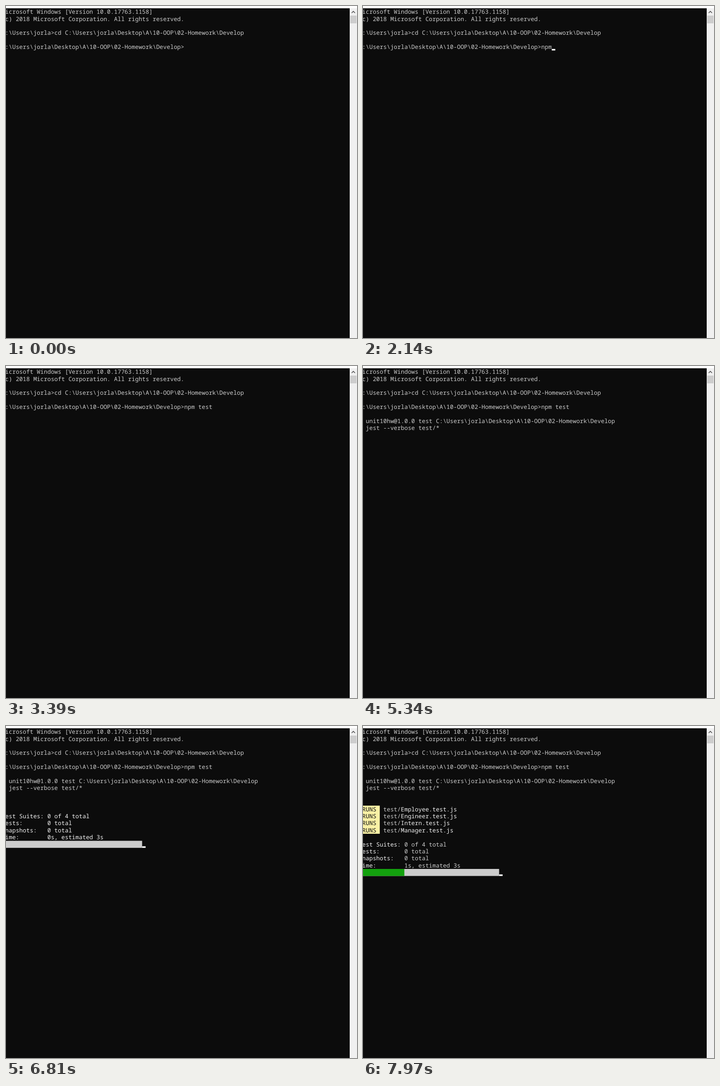
An HTML page with a canvas for the animation above (8000 ms loop, 770 by 727 pixels).

```html
<!DOCTYPE html>
<html lang="en">
<head>
<meta charset="utf-8">
<title>Terminal test run</title>
<style>
  html, body { margin: 0; width: 100%; height: 100%; overflow: hidden; background: #0c0c0c; }
  canvas { display: block; }
</style>
</head>
<body>
<canvas id="stage" width="770" height="727"></canvas>
<script>
const ctx = document.getElementById('stage').getContext('2d');
const LOOP = 8000;
const CELL_W = 7.7, CELL_H = 15.4, LEFT = -9.4, TOP = 5;
const GREY = '#cccccc', WHITE = '#f2f2f2', BLACK = '#0c0c0c', GREEN = '#13a10e', YELLOW = '#f9f1a5';
const BAR_COLS = 40;

const HOME = 'C:\\Users\\jorla';
const FOLDER = HOME + '\\Desktop\\A\\10-OOP\\02-Homework\\Develop';
const PROMPT = FOLDER + '>';
const COMMAND = 'npm test';

// Time at which each character of the command appears
const KEY_TIMES = [1680, 1910, 2140, 2540, 2920, 3080, 3170, 3390];
// Spans in which the prompt cursor is hidden
const CURSOR_OFF = [[0, 1300], [1840, 1910], [2310, 2540], [2850, 2920], [3390, LOOP]];

const colX = col => LEFT + col * CELL_W;
const rowY = row => TOP + row * CELL_H;

function rect(x, y, w, h, color) {
  ctx.fillStyle = color;
  ctx.fillRect(x, y, w, h);
}

function cells(col, row, cols, rows, color) {
  rect(colX(col), rowY(row), cols * CELL_W, rows * CELL_H, color);
}

function print(text, col, row, color = GREY) {
  ctx.fillStyle = color;
  const baseline = Math.round(rowY(row) + 12.2);
  [...text].forEach((ch, i) => {
    if (ch !== ' ') ctx.fillText(ch, colX(col + i), baseline);
  });
}

function cursor(col, row) {
  rect(colX(col), rowY(row + 1) - 3.4, CELL_W, 3.4, '#ffffff');
}

function drawWindow() {
  rect(0, 0, 770, 727, BLACK);
  rect(0, 0, 770, 5, '#ffffff');
  rect(754, 5, 16, 722, '#f0f0f0');
  rect(755, 21, 14, 17, '#cdcdcd');
  ctx.strokeStyle = '#505050';
  ctx.lineWidth = 1.6;
  ctx.beginPath();
  ctx.moveTo(758.3, 15.3);
  ctx.lineTo(762, 11.6);
  ctx.lineTo(765.7, 15.3);
  ctx.stroke();
}

function drawPrompt(t) {
  print('Microsoft Windows [Version 10.0.17763.1158]', 0, 0);
  print('(c) 2018 Microsoft Corporation. All rights reserved.', 0, 1);
  print(HOME + '>cd ' + FOLDER, 0, 3);
  const typed = KEY_TIMES.filter(time => t >= time).length;
  print(PROMPT + COMMAND.slice(0, typed), 0, 5);
  if (!CURSOR_OFF.some(([from, to]) => t >= from && t < to)) cursor(PROMPT.length + typed, 5);
}

function drawSummary(row, valueColor, seconds, doneCols) {
  const lines = [
    ['Test Suites:', '0 of 4 total'],
    ['Tests:', '0 total'],
    ['Snapshots:', '0 total'],
    ['Time:', seconds + 's, estimated 3s'],
  ];
  lines.forEach(([label, value], i) => {
    print(label, 0, row + i, WHITE);
    print(value, 13, row + i, valueColor);
  });
  cells(0, row + 4, BAR_COLS, 1, GREY);
  cells(0, row + 4, doneCols, 1, GREEN);
}

function drawRunning() {
  cells(0, 11, 6, 4, YELLOW);
  ['Employee', 'Engineer', 'Intern', 'Manager'].forEach((name, i) => {
    print('RUNS', 1, 11 + i, BLACK);
    print('test/', 7, 11 + i);
    print(name + '.test.js', 12, 11 + i, WHITE);
  });
}

function drawTests(t) {
  if (t < 5340) return;
  print('> unit10hw@1.0.0 test ' + FOLDER, 0, 7);
  print('> jest --verbose test/*', 0, 8);
  if (t < 6730) return;
  if (t < 6810) {
    const notice = 'Determining test suites to run...';
    print(notice, 0, 10, WHITE);
    cursor(notice.length, 10);
  } else if (t < 6960) {
    drawSummary(12, WHITE, 0, 0);
    cursor(BAR_COLS, 16);
  } else {
    const ticked = t >= 7970;
    drawRunning();
    drawSummary(16, GREY, ticked ? 1 : 0, ticked ? 13 : 0);
    if (t < 7590 || ticked) cursor(BAR_COLS, 20);
  }
}

ctx.font = '12.8333px "Noto Sans Mono", "DejaVu Sans Mono", monospace';
ctx.textRendering = 'geometricPrecision';

const start = performance.now();
function frame() {
  const t = (performance.now() - start) % LOOP;
  drawWindow();
  drawPrompt(t);
  drawTests(t);
  requestAnimationFrame(frame);
}
frame();
</script>
</body>
</html>
```
